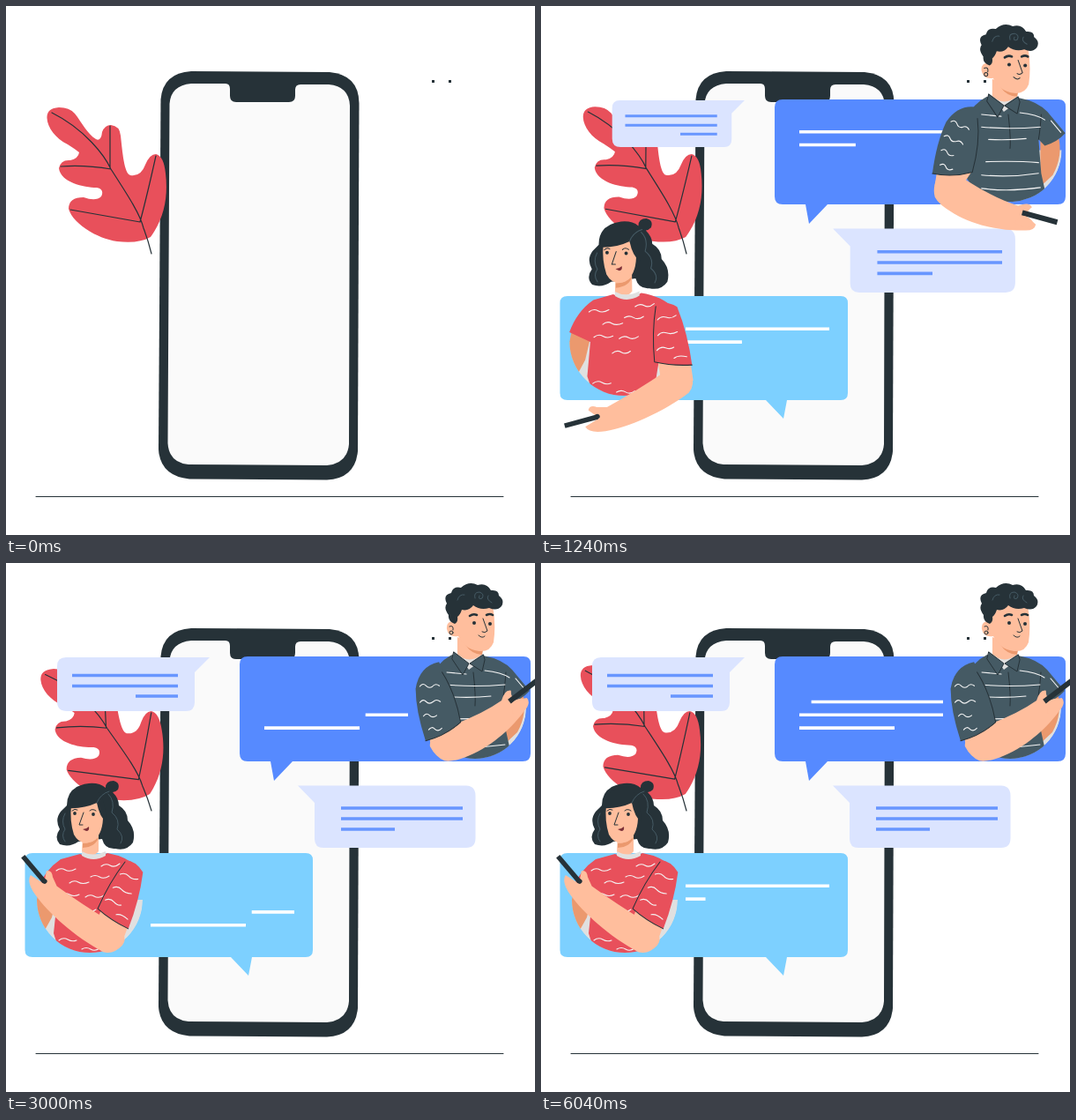
These frames come from a looping animation (600 px wide and 600 px high, 6.08 s). An HTML page:

```html
<!DOCTYPE html>
<html lang="en">
<head>
<meta charset="utf-8">
<title>Chat</title>
<style>
html, body { margin: 0; width: 100%; height: 100%; overflow: hidden; background: #fff; }
svg { display: block; width: 100vw; height: 100vh; }
.dark { fill: #263238; } .skin { fill: #ffbe9d; } .shade { fill: #eb996e; }
.red { fill: #e8505b; } .slate { fill: #455a64; } .pale { fill: #dbe4ff; } .grey { fill: #e0e0e0; }
.line { fill: none; stroke: #263238; stroke-linecap: round; stroke-linejoin: round; }
.curl { stroke: #455a64; }
.mark { fill: none; stroke: #f4f4f4; stroke-width: 1.1; stroke-linecap: round; }
.text { fill: none; stroke: #6896ff; stroke-width: 3.5; }
.type { fill: none; stroke: #fff; stroke-width: 3.6; }
.rod { stroke-linecap: butt; }
</style>
</head>
<body>
<svg viewBox="0 0 600 600">
  <defs>
    <clipPath id="manClip"><path d="M400 0H640V164H590A58 58 0 0 1 474 164H400Z"/></clipPath>
    <clipPath id="womanClip"><path d="M0 200H200V382H155A60 60 0 0 1 35 382H0Z"/></clipPath>
  </defs>

  <path class="line" d="M34 556.5H564"/>

  <g id="phone">
    <path class="dark" d="M210 74L367 75Q400 78 400.500 110L399 505Q396 536 364 537.500L208 536.500Q175 533 173 503L175.500 106Q178 76 210 74Z"/>
    <path fill="#fafafa" d="M210 88H249Q254 88 254 94V102Q254 109 261 109H321Q328 109 328 102V95Q328 89 334 89H366Q389 91 390 113L389 497Q387 519 364 521L207 520Q185 518 183.500 496L185.500 111Q187 90 210 88Z"/>
  </g>

  <g id="leaf">
    <path class="red" d="M46.500 127Q46 116 60 115Q72 115 78 122C86 132 92 145 102 151Q108 154 109 143Q112 135 119 135Q129 136 130 147C132 165 134 190 141 192Q153 194 158 180Q163 168 170 168Q179 170 181 190C184 215 180 240 164 262Q150 270 126 267C100 263 75 245 71 230Q71 217 88 217Q102 222 108 216Q112 208 103 206C88 206 62 200 60 184Q62 174 73 175Q82 173 83 166Q78 162 70 157C56 150 47 138 46.500 127Z"/>
    <path class="line" stroke-width="1.200" d="M52 121C90 140 112 170 119 185C135 210 152 235 156 252Q161 265 165 281M118 136V184M62 182Q90 180 119 185M73 231L152 245M170 170Q160 215 152 245"/>
  </g>

  <g id="leftChat">
    <path class="pale" d="M231 107H68Q58 107 58 117V157Q58 168 69 168H204Q214 168 214 158V124Z"/>
    <path class="text" d="M75 127.500H195M75 139.500H195M147 151H195"/>
  </g>
  <g id="rightChat">
    <path class="pale" d="M331 252.500H522Q532.500 253 532.500 264V312Q532.500 323 522 323H360Q350 323 350 313V272Z"/>
    <path class="text" d="M380 278H518M380 290H518M380 302H441"/>
  </g>

  <g id="blue">
    <path fill="#568aff" d="M274 106H587Q595 106 595 114V216Q595 225 586 225H325L304 247L300 225H274Q265 225 265 216V115Q265 106 274 106Z"/>
    <g id="blueText"></g>
    <g id="man">
      <g clip-path="url(#manClip)">
        <path class="grey" d="M474 164a58 58 0 0 0 116 0Z"/>
        <path class="shade" d="M566 150L586 148Q592 170 580 192L566 205Z"/>
        <path class="slate" d="M506 104Q524 112 541 105Q563 109 574 121L594 145Q585 155 571 159L564 152L567 190L574 222H488L482 192L482 130Q490 112 506 104Z"/>
        <path class="line" d="M567 124Q566 140 564 152M530 124Q533 150 532 162"/>
        <path class="mark" d="M500 124L522 126M543 122Q562 124 571 130M500 138Q530 141 566 138M508 152Q530 153 550 151M505 177Q540 176 564 178M500 192Q532 195 564 190M500 207Q530 211 566 206M578 131L589 144"/>
      </g>
      <path class="skin" d="M512 84L540 96V108Q525 120 512 106Z"/>
      <path class="shade" d="M521 93Q532 101 541 99L540 104Q529 104 521 93Z"/>
      <path class="grey" d="M512 103Q525 116 541 103L541 109L525 121Z"/>
      <g class="line">
        <path class="slate" d="M508 101L525 114L518 127L506 109ZM541 104L526 114L540 123L543 110Z"/>
      </g>
      <g id="manHead">
        <path class="skin" d="M509 48H552Q556 70 553 90Q549 101 537 100Q520 98 513 83Q502 85 500 75Q499 66 508 66Z"/>
        <path class="dark" d="M509 69Q501 66 502 59Q496 51 500 46Q495 36 505 34Q507 26 516 28Q525 20 535 25Q545 22 550 31Q559 30 559 37Q566 42 562 49Q557 55 548 51Q538 54 530 48Q525 55 517 53Q515 59 512 61Q513 67 509 69Z"/>
        <path class="line curl" d="M532 40Q530 33 537 33Q543 35 540 40Q535 42 537 37M551 45Q544 41 547 37M512 42Q514 35 520 36"/>
        <path class="line" stroke-width="2.600" d="M526 60Q530 57 534 59M545 59Q549 57 552 59"/>
        <path class="line" d="M541 63L546 77Q543 80 540 78M536 82Q540 86 543 83M503 72Q508 70 507 76"/>
        <circle class="line" cx="505" cy="79" r="2"/>
        <g id="manEyes" class="dark"><circle cx="531" cy="68" r="2"/><circle cx="549" cy="69" r="2"/></g>
      </g>
      <g id="manArm">
        <path class="skin" d="M470 190L508 184L500 214Q484 228 474 212Z"/>
        <g id="manForearm">
          <path class="skin" d="M472 204Q474 218 482 225Q490 230 510 229C540 228 570 214 586 203Q597 197 594 190L581 188Q577 183 580 176Q574 172 566 183Q540 190 505 190Q476 188 472 204Z"/>
          <path class="line rod" stroke-width="6" d="M574 187L613 175"/>
          <path class="skin" d="M576 190Q584 186 591 190L588 199L572 202Z"/>
        </g>
        <path class="slate" d="M493 113Q470 115 463 140Q460 165 467 200Q490 197 509 184Q508 150 493 113Z"/>
        <path class="line" d="M495 125Q507 150 509 184Q490 197 467 200"/>
        <path class="mark" d="M468 138q4 -4 7 0t7 2q4 -4 8 0M466 156q4 -4 7 0t8 1q4 -3 8 1M468 172q4 -4 7 0t8 1M472 188q4 -4 7 0t8 0"/>
      </g>
    </g>
  </g>

  <g id="light">
    <path fill="#7dd0ff" d="M30 329H340Q348 329 348 337V439Q348 447 340 447H279L275 468L255 447H30Q21.500 447 21.500 439V337Q21.500 329 30 329Z"/>
    <g id="lightText"></g>
    <g id="woman">
      <g clip-path="url(#womanClip)">
        <path class="grey" d="M35 382a60 60 0 0 0 120 0Z"/>
        <path class="shade" d="M38 368L58 378L52 402L42 420L30 405Z"/>
        <path class="red" d="M84 330Q100 338 115 329Q138 333 150 346L134 400L126 445H62L54 420L58 382L35 371Q44 348 62 336Z"/>
        <path class="mark" d="M57 349q5 -4 10 -1t12 -1M108 344q5 -4 10 -1t11 -2M72 363q5 -4 10 -1t12 0M96 356q5 -3 10 0t11 -1M62 377q5 -4 10 -1t11 0M90 379q5 -4 10 -1t11 -1M82 395q5 -4 10 -1t10 -1M60 428q5 -4 10 -1t10 1M86 438q5 -3 10 0t10 -1"/>
      </g>
      <path class="dark" d="M113 255Q113 247 122 247Q130 249 127 257Q124 260 121 260Q128 267 128 275Q138 281 138 292Q148 303 144 317Q137 327 124 324Q112 325 109 313L82 316Q72 323 61 319Q54 311 61 302Q55 291 62 282Q66 278 69 275Q69 253 94 250Q106 249 113 255Z"/>
      <path class="skin" d="M87 309H105V327Q98 336 86 328Z"/>
      <path class="shade" d="M87 318Q98 318 105 311Q102 322 87 323Z"/>
      <path class="grey" d="M86 327Q98 334 113 327V332Q99 340 86 332Z"/>
      <path class="skin" d="M74 275L104 268Q112 276 110 290Q109 309 98 316Q84 321 77 308Q72 292 74 275Z"/>
      <path class="dark" d="M70 278Q71 256 98 254Q113 262 114 294Q106 288 103 272Q88 279 70 278Z"/>
      <path class="line curl" d="M116 262Q124 270 120 283Q130 291 126 302Q135 310 130 318M67 284Q62 293 67 302Q62 309 67 316M103 272Q107 262 117 259"/>
      <path class="line" d="M88 283L83 297H87M75 281Q78 278 81 280M95 281Q98 278 102 281"/>
      <path d="M87 302Q91 302 94 299Q95 304 91 304Z" fill="#7d3038"/>
      <g id="womanEyes" class="dark"><circle cx="78" cy="284" r="1.900"/><circle cx="99" cy="285" r="1.900"/></g>
      <g id="womanArm">
        <path class="skin" d="M123 398L158 408L157 430Q140 450 122 430Z"/>
        <g id="womanForearm">
          <path class="skin" d="M130 413Q158 410 158 426Q157 440 146 445C110 452 70 450 45 443Q28 438 27 429L45 427L38 414Q42 409 48 415L58 420Q95 418 130 413Z"/>
          <path class="line rod" stroke-width="5.500" d="M7 418L44 425"/>
          <circle class="dark" cx="44" cy="424.500" r="2.700"/>
        </g>
        <path class="red" d="M130 341Q142 336 155 347Q161 378 159 413Q137 410 119 402Q121 370 130 341Z"/>
        <path class="line" d="M132 342Q122 370 119 402Q137 410 159 413"/>
        <path class="mark" d="M131 357q5 -4 10 -1t11 0M128 374q5 -4 10 -1t12 1M124 390q5 -4 10 -1t9 1M141 402q5 -3 14 1"/>
      </g>
    </g>
  </g>

  <path class="dark" d="M483 84h3v3h-3zM502 84h3v3h-3z"/>
</svg>
<script>
const LOOP = 6080;
const el = id => document.getElementById(id);
const clamp = v => Math.max(0, Math.min(1, v));
const progress = (t, start, length) => clamp((t - start) / length);
const smooth = u => (1 - Math.cos(Math.PI * u)) / 2;
const mix = (a, b, u) => a + (b - a) * u;
const set = (id, transform) => el(id).setAttribute('transform', transform);
const rotate = (id, angle, x, y) => set(id, `rotate(${angle} ${x} ${y})`);

function scaleAt(id, sx, x, y, sy = sx, angle = 0) {
  el(id).style.display = sx > 0.002 ? '' : 'none';
  set(id, `translate(${x} ${y}) rotate(${angle}) scale(${sx} ${sy}) translate(${-x} ${-y})`);
}

// Ease-out that passes 1 and settles back.
function pop(t, start, length, over = 1) {
  const u = progress(t, start, length) - 1;
  return 1 + (over + 1) * u ** 3 + over * u ** 2;
}

// Eased interpolation through [time, value] pairs.
function track(t, keys) {
  const i = keys.findIndex(k => k[0] > t);
  if (i < 0) return keys[keys.length - 1][1];
  if (i === 0) return keys[0][1];
  const [a, b] = [keys[i - 1], keys[i]];
  return mix(a[1], b[1], smooth((t - a[0]) / (b[0] - a[0])));
}

// Four lines, each typed and then wiped from the left on its own repeating clock.
function textLines(id, left, top, period) {
  const lines = [163, 163, 163, 108].map((width, i) => {
    const path = document.createElementNS('http://www.w3.org/2000/svg', 'path');
    path.setAttribute('class', 'type');
    el(id).append(path);
    return { path, width, y: top + i * 14.8, typeAt: 758 + i * 347, wipeAt: 2225 + i * 287 };
  });
  return t => lines.forEach(({ path, width, y, typeAt, wipeAt }) => {
    const local = t < typeAt ? t : typeAt + (t - typeAt) % period;
    const from = left + width * progress(local, wipeAt, 287);
    const to = left + width * progress(local, typeAt, 347);
    path.setAttribute('d', to > from ? `M${from} ${y}H${to}` : '');
  });
}

const typeBlue = textLines('blueText', 293, 142.7, 3505);
const typeLight = textLines('lightText', 164, 366.3, 2444);

function draw(t) {
  rotate('leaf', track(t, [[0, 0], [800, 0.8], [3000, -2.7], [5200, -0.2], [6080, -0.6]]), 165, 281);

  scaleAt('leftChat', pop(t, 860, 1100), 231, 107);
  scaleAt('rightChat', pop(t, 690, 700), 325, 250);
  scaleAt('blue', pop(t, 40, 1200, 1.25), 304, 247);
  scaleAt('light', pop(t, 480, 480), 275, 468);
  typeBlue(t);
  typeLight(t);

  scaleAt('man', 1 + 0.05 * Math.sin(Math.PI * progress(t, 400, 900)), 532, 215);
  const lean = -4 * (1 - progress(t, 700, 700));
  scaleAt('woman', pop(t, 702, 700), 95, 442, undefined, lean);

  const sway = track(t, [[3000, 0], [3920, 1], [5120, 1], [6040, 0]]);
  const manLift = smooth(progress(t, 900, 1400));
  rotate('manArm', mix(23, -7, manLift), 485, 128);
  rotate('manForearm', mix(18, -13, manLift) + sway, 484, 209);

  const womanLift = smooth(progress(t, 1270, 1250));
  rotate('womanArm', mix(-10, 18, womanLift), 143, 350);
  rotate('womanForearm', mix(-15, 21, womanLift) + 3 * sway, 138, 430);

  const blink = 1 - 0.7 * Math.max(0, 1 - Math.abs(t - 3920) / 120);
  scaleAt('manEyes', 1, 540, 68.5, blink);
  scaleAt('womanEyes', 1, 88, 284.5, blink);
}

const start = performance.now();
function tick(now) {
  draw(Math.max(0, now - start) % LOOP);
  requestAnimationFrame(tick);
}
tick(start);
</script>
</body>
</html>
```
